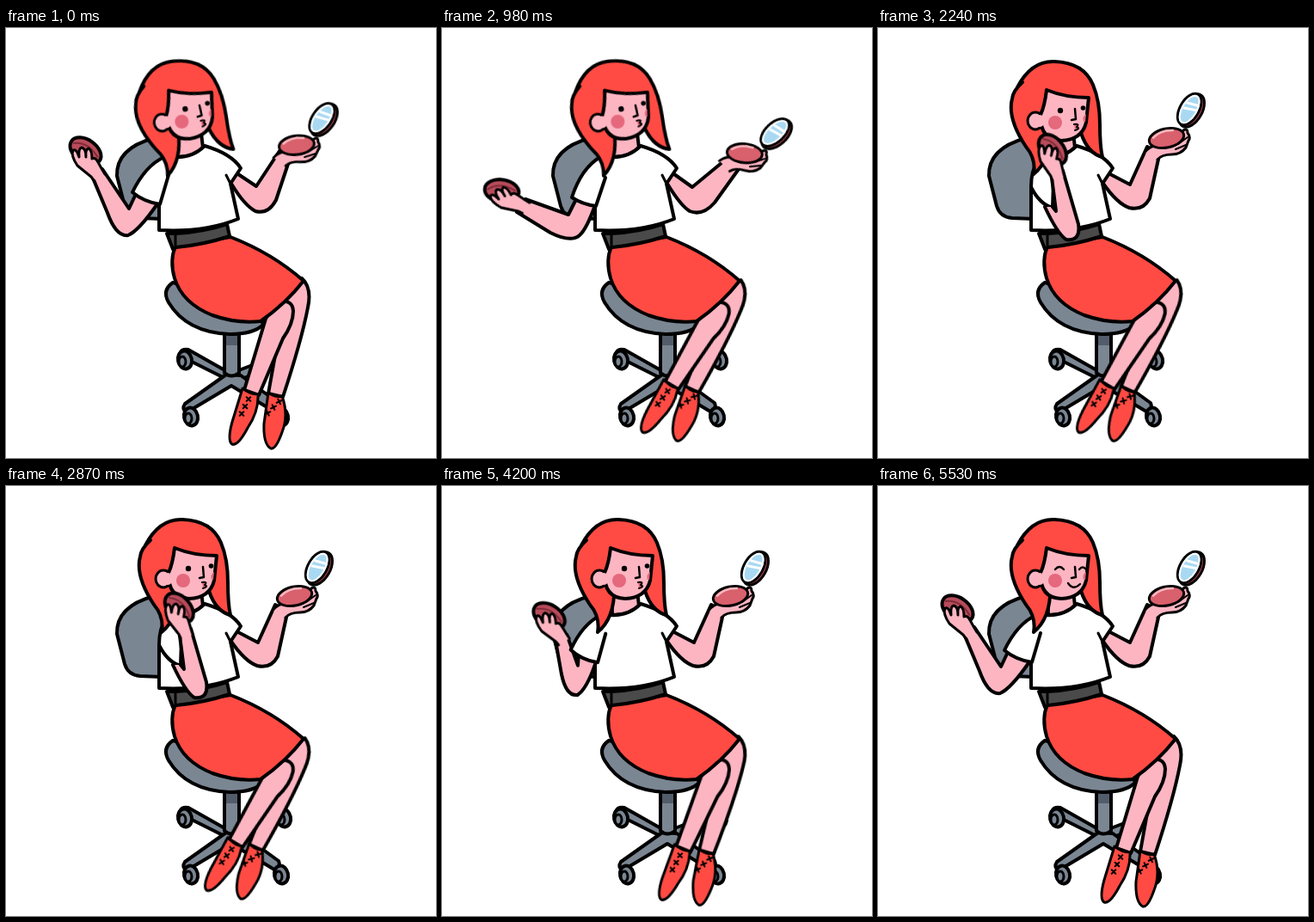
Recreate the animation shown at these times as an HTML page without scripts. Size 500x500 px, loop 5600 ms.

```html
<!DOCTYPE html>
<html lang="en">
<head>
<meta charset="utf-8">
<title>Powder break</title>
<style>
  html, body { margin: 0; width: 100%; height: 100%; overflow: hidden; background: #fff; }
  svg { display: block; width: 100%; height: 100%; }
  svg * { transform-box: view-box; }

  .ink { stroke: #000; stroke-width: 4; stroke-linecap: round; stroke-linejoin: round; }
  .fine { stroke-width: 3; }
  .line { fill: none; }
  .skin { fill: #fdb5c2; }
  .red { fill: #ff4b43; }
  .white { fill: #fff; }
  .steel { fill: #7b8693; }
  .belt { fill: #4a4a4a; }
  .rose { fill: #b94b5b; }
  .blush { fill: #e5687c; }

  .arm, .sleeve, .front-arm, .hand, .pat, .mirror-arm, .mirror-hand,
  .shin, .head, .open, .blink, .smile, .pout {
    animation: 5600ms ease-in-out infinite;
  }

  /* powder arm: raised, low, bent, then pressed to the cheek */
  .arm { animation-name: arm, arm-away; animation-timing-function: ease-in-out, step-end; }
  @keyframes arm {
    0%, 80.5%, 100% { d: path("M151 193 L143 210 L112 164 L100 172 L118 215 Q128 243 142 241 Q154 236 175 206"); }
    10%, 19.5% { d: path("M157 197 L147 217 L97 199 L87 214 L126 238 Q150 250 160 241 Q168 234 178 206"); }
    23.75%, 71.2% { d: path("M163 198 L166 208 L163 178 L149 183 L150 220 Q153 246 166 244 Q176 236 180 207"); }
  }
  @keyframes arm-away { 0%, 71.2% { visibility: visible; } 25% { visibility: hidden; } }

  .front-arm { animation-name: arm-close; animation-timing-function: step-end; }
  @keyframes arm-close { 0%, 71.2% { visibility: hidden; } 25% { visibility: visible; } }

  .sleeve { animation-name: sleeve; }
  @keyframes sleeve {
    0%, 76%, 100% { d: path("M184 150 Q162 160 147 191 Q160 202 179 205 L189 171"); }
    10%, 21% { d: path("M184 150 Q162 163 151 197 Q163 205 179 207 L190 174"); }
    25%, 71.2% { d: path("M186 155 Q178 165 178 185 Q188 205 203 209 L204 178"); }
  }

  .hand { animation-name: hand; }
  @keyframes hand {
    0%, 80.5%, 100% { transform: translate(105px, 168px); }
    10%, 19.5% { transform: translate(92px, 206px) rotate(-27deg); }
    23.75% { transform: translate(155px, 180px) rotate(-8deg); }
    25%, 68.7% { transform: translate(208px, 169px); }
    71.2% { transform: translate(156px, 180px) rotate(-4deg); }
  }

  .pat { animation-name: pat; }
  @keyframes pat {
    0%, 23%, 32.9%, 43.6%, 54.3%, 65%, 100% { transform: rotate(0deg); }
    27.5%, 38.2%, 48.9%, 59.6% { transform: rotate(21deg); }
  }

  .mirror-arm { animation-name: mirror-arm; }
  @keyframes mirror-arm {
    0% { d: path("M270 170 L291 184 L318 143 L329 155 L314 200 Q305 217 290 213 Q277 206 262 181"); }
    10%, 19.5% { d: path("M270 170 L291 185 L331 152 L345 164 L317 203 Q303 219 288 213 Q277 206 262 181"); }
    26%, 100% { d: path("M270 170 L293 182 L313 138 L327 148 L316 198 Q308 213 292 209 Q278 204 262 181"); }
  }

  .mirror-hand { animation-name: mirror-hand; }
  @keyframes mirror-hand {
    0% { transform: translate(323px, 152px) rotate(5deg); }
    9% { transform: translate(336px, 160px) rotate(19deg); }
    11.5%, 19.5% { transform: translate(334px, 158px) rotate(17deg); }
    26%, 100% { transform: translate(322px, 145px); }
  }

  .shin { animation-name: swing; }
  .near { transform-origin: 318px 329px; }
  .far { transform-origin: 335px 310px; }
  @keyframes swing {
    0%, 78%, 100% { transform: rotate(0deg); }
    9%, 69.5% { transform: rotate(11.5deg); }
  }

  .head { animation-name: head; transform-origin: 212px 115px; }
  @keyframes head {
    0%, 20% { transform: translate(-1px, -2px) rotate(-8deg); }
    25.5%, 100% { transform: none; }
  }

  .open, .blink, .smile, .pout { animation-timing-function: step-end; }
  .open { animation-name: open; }
  .blink { animation-name: blink; }
  .smile { animation-name: smile; }
  .pout { animation-name: pout; }
  @keyframes open { 0% { visibility: visible; } 83.7%, 100% { visibility: hidden; } }
  @keyframes blink { 0%, 85%, 100% { visibility: hidden; } 83.7% { visibility: visible; } }
  @keyframes smile { 0% { visibility: hidden; } 85%, 100% { visibility: visible; } }
  @keyframes pout { 0% { visibility: visible; } 85%, 100% { visibility: hidden; } }
</style>
</head>
<body>
<svg viewBox="0 0 500 500" xmlns="http://www.w3.org/2000/svg">
  <defs>
    <g id="castor">
      <ellipse class="ink steel" rx="8" ry="10.5" transform="rotate(-12)"/>
      <ellipse class="ink fine steel" cx="-3" cy="2" rx="4" ry="6"/>
    </g>
    <path id="cross" class="ink line" style="stroke-width:2" d="M-2.3 -2.3 L2.3 2.3 M2.3 -2.3 L-2.3 2.3"/>
    <g id="laces">
      <use href="#cross" x="4" y="-8.5"/>
      <use href="#cross"/>
      <use href="#cross" x="-4" y="8.5"/>
    </g>
  </defs>

  <!-- chair -->
  <path class="ink steel" d="M172 128 Q128 140 129 172 L138 207 Q142 220 156 221 L182 222 L195 150 Z"/>
  <g class="ink steel">
    <path d="M268 399 L318 380 L321 389 L272 409 Z"/>
    <path d="M258 400 L212 374 Q203 372 202 381 L254 407 Z"/>
    <path d="M256 403 L208 437 Q204 443 210 447 L262 416 L312 446 Q320 443 317 436 L273 404 Z"/>
    <path d="M254 350 V401 Q262 408 271 401 V350 Z"/>
  </g>
  <path fill="#525c6b" d="M256 354 H269 V369 H256 Z"/>
  <use href="#castor" x="208" y="386"/>
  <use href="#castor" x="215" y="452"/>
  <use href="#castor" x="323" y="386"/>
  <use href="#castor" x="320" y="452"/>
  <path class="ink steel" d="M194 296 Q181 305 189 319 Q210 354 260 356 Q288 356 299 345 L290 320 Z"/>

  <!-- legs -->
  <g class="shin far">
    <path class="ink skin" d="M344 291 Q356 302 351 325 Q344 362 322 429 L305 425 L314 375 L315 310 Z"/>
    <path class="ink red fine" d="M305 424 Q313 430 321 428 Q329 450 321 470 Q314 490 308 489 Q299 484 300 460 Z"/>
    <use href="#laces" transform="translate(311 441) rotate(20)"/>
  </g>
  <g class="shin near">
    <path class="ink skin" d="M314 319 Q333 314 334 329 Q334 344 322 361 L294 427 L277 421 L302 338 Z"/>
    <path class="ink red fine" d="M275 419 Q284 426 293 426 Q294 446 281 465 Q270 486 263 484 Q257 480 263 458 Z"/>
    <use href="#laces" x="278" y="440"/>
  </g>

  <!-- body -->
  <path class="ink red" d="M197 254 Q190 270 196 291 Q205 320 240 334 Q268 344 296 341 Q326 320 346 294 Q310 262 261 243 Z"/>
  <path class="ink belt" d="M187 239 L197 239 Q230 237 257 228 L260 242 Q230 252 198 255 L194 257 Z"/>
  <path class="ink line fine" d="M197 239 V255"/>
  <path class="ink skin" d="M197 122 L198 150 L230 148 L227 122 Z"/>
  <path class="ink skin mirror-arm"/>
  <path class="ink white" d="M188 149 Q214 154 231 137 Q262 146 273 163 L261 181 L270 222 Q230 238 178 235 L178 185 Z"/>
  <path class="ink line fine" d="M261 181 L256 171"/>
  <path class="ink skin arm"/>
  <path class="ink white sleeve"/>

  <!-- head -->
  <g class="head">
    <path class="ink red" d="M162 69 Q178 38 205 39 Q239 40 250 66 Q258 85 258 112 Q258 138 261 150 Q244 146 236 122 L200 110 Q203 152 181 170 Q184 152 172 138 Q150 105 156 82 Q157 73 168 63"/>
    <ellipse class="ink skin fine" cx="183" cy="108" rx="9" ry="10"/>
    <path class="ink skin" d="M196 72 Q194 90 189 101 Q188 130 213 131 Q237 130 242 110 L245 81 Q218 81 196 72"/>
    <ellipse class="skin" cx="188" cy="108" rx="6" ry="7"/>
    <circle class="blush" cx="206" cy="110" r="8"/>
    <path class="blush" d="M242 100 Q237 103 239 109 L241 109 Z"/>
    <path class="ink line" style="stroke-width:2.5" d="M229 94 L230 106 L225 107"/>
    <g class="open">
      <circle cx="212" cy="96" r="3.2"/>
      <circle cx="238.5" cy="93" r="2.8"/>
    </g>
    <path class="blink ink line fine" d="M209 95 L215 95 M236 95 L241 95"/>
    <path class="smile ink line" style="stroke-width:2.3" d="M206 97 Q211 91 216 97 M234 97 Q238 92 242 97 M221 113 Q227 122 235 114"/>
    <path class="pout ink blush" style="stroke-width:2" d="M228 112 Q235 111 231 115 Q236 117 229 119"/>
  </g>

  <!-- mirror -->
  <g class="mirror-hand">
    <path class="ink skin fine" d="M-12 0 Q-5 -10 6 -8 L24 -12 L33 -26 Q38 -29 38 -23 Q42 -18 39 -14 L36 -6 Q30 2 20 2 Q8 2 3 8"/>
    <path class="ink line" style="stroke-width:2" d="M27 -10 L38 -18 M24 -4 L36 -9"/>
    <g transform="translate(13.5 -17) rotate(-12)">
      <ellipse class="ink fine" rx="20.5" ry="11" fill="#d9606d"/>
      <path class="line" stroke="#f6b8bf" stroke-width="2.5" d="M-16 -3 Q-5 -11 10 -7"/>
    </g>
    <g transform="translate(41 -50) rotate(30)">
      <ellipse class="ink rose fine" cx="2" rx="12" ry="21"/>
      <ellipse class="ink fine" cx="-1" rx="11" ry="20" fill="#a9d9f2"/>
      <ellipse class="line" cx="-1" rx="8.5" ry="17.5" stroke="#fff" stroke-width="2"/>
      <path class="line" stroke="#fff" stroke-width="3" d="M-8 -5 L7 -9 M-8 2 L7 -3"/>
    </g>
  </g>

  <!-- powder -->
  <path class="front-arm ink skin" d="M203 208 L207 213 L202 174 L215 166 L233 228 Q236 248 219 246 Q209 240 194 208"/>
  <g class="hand"><g class="pat">
    <g transform="translate(-12.5 -25) rotate(35)">
      <ellipse class="ink rose" rx="20" ry="13"/>
      <path class="line" stroke="#7e2c39" stroke-width="2" d="M-17 1 Q-4 -11 16 -2"/>
    </g>
    <path class="ink skin fine" d="M-3 9 L-6 5 L-22 -8 Q-30 -20 -27 -26 Q-23 -28 -20 -18 Q-21 -28 -17 -29 Q-12 -28 -12 -18 Q-13 -27 -9 -28 Q-5 -26 -5 -16 Q-1 -18 2 -12 L7 -3 L10 2"/>
  </g></g>
</svg>
</body>
</html>
```
